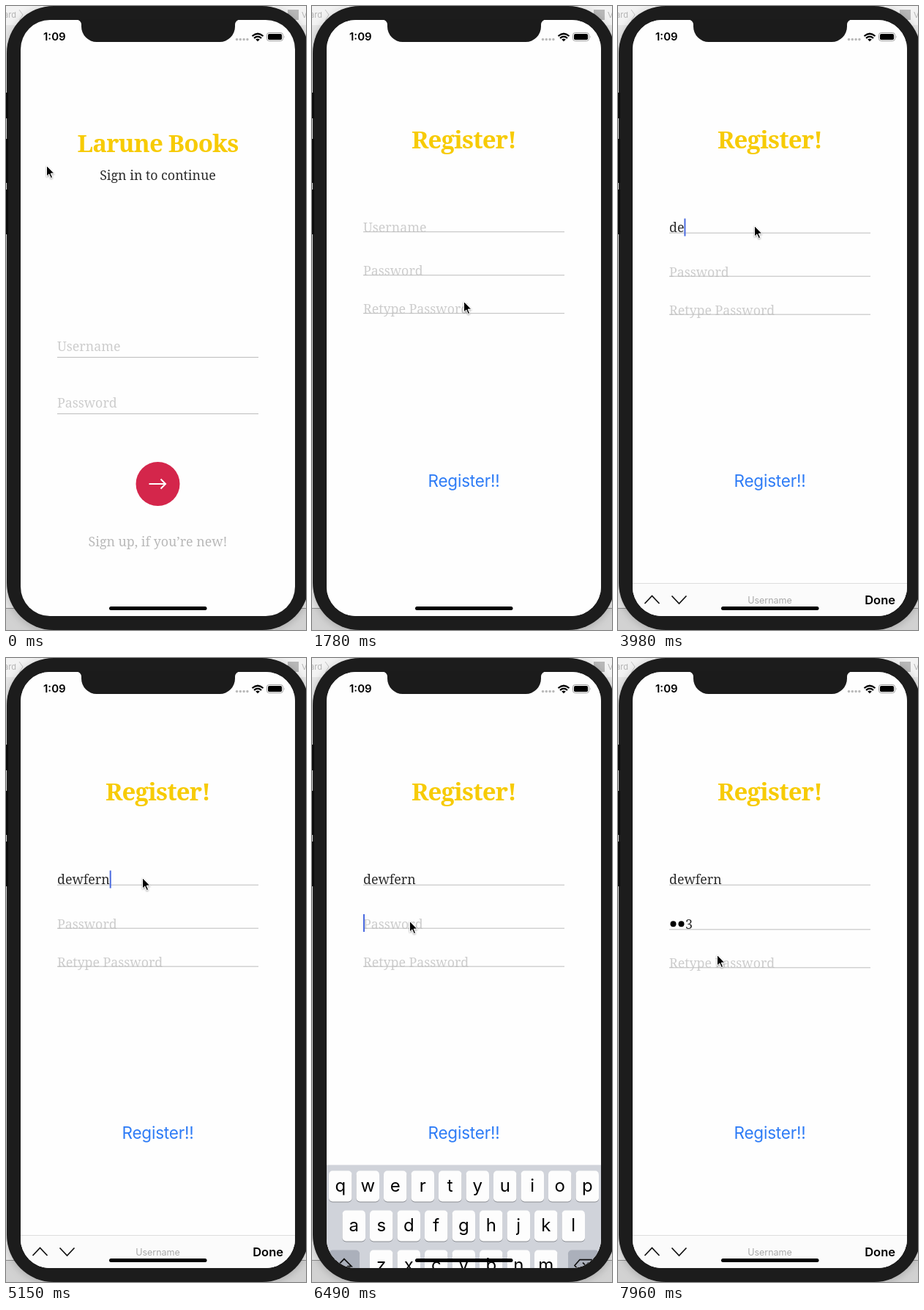
These frames come from a looping animation (410 px wide and 850 px high, 8 s). An HTML page:

```html
<!DOCTYPE html>
<html lang="en">
<head>
<meta charset="utf-8">
<title>Sign-up screen</title>
<style>
  html, body { margin: 0; width: 100%; height: 100%; overflow: hidden; background: #e6e6e6; }
  svg { display: block; }
  .slab { font: 300 17.8px "Noto Serif", serif; fill: #2c2c2c; }
  .hint { fill: #cdcdcd; }
  .title { font: 700 33px "Noto Serif", serif; letter-spacing: -0.8px; fill: #f7cb05; }
  .ui { font-family: Inter, Roboto, sans-serif; }
  .mid { text-anchor: middle; }
  .rule { stroke: #bdbdbd; stroke-width: 1; }
  .key { font-size: 24px; fill: #000; text-anchor: middle; }
  .icon { fill: none; stroke: #111; stroke-width: 1.7; }
</style>
</head>
<body>
<svg width="410" height="850" viewBox="0 0 410 850">
  <defs>
    <clipPath id="glass"><rect x="20" y="19" width="375" height="812" rx="40"/></clipPath>
    <filter id="soft" x="-50%" y="-50%" width="200%" height="200%">
      <feDropShadow dx="0" dy="1" stdDeviation="0.8" flood-opacity="0.4"/>
    </filter>
    <filter id="shade" x="-10%" y="-10%" width="120%" height="120%">
      <feDropShadow dx="0" dy="2" stdDeviation="6" flood-opacity="0.2"/>
    </filter>
  </defs>

  <!-- desktop behind the phone -->
  <rect width="410" height="850" fill="#e6e6e6"/>
  <rect width="410" height="26" fill="#f3f3f3"/>
  <rect y="820" width="410" height="30" fill="#d2d2d2"/>
  <path d="M0 820.5H410" stroke="#8c8c8c"/>
  <g class="ui" font-size="11" fill="#b4b4b4">
    <text x="-3" y="16">ard</text><text x="404" y="16">V</text>
  </g>
  <path d="M18 5l5 7-5 8" fill="none" stroke="#c4c4c4"/>
  <rect x="385" y="5" width="15" height="14" fill="#b8b8b8"/>

  <!-- phone body -->
  <rect x="1" y="0" width="413" height="850" rx="64" fill="#1b1b1b" filter="url(#shade)"/>
  <path d="M0 118h3v35H0zM0 181h3v60H0zM0 250h3v61H0z" fill="#0c0c0c"/>

  <g clip-path="url(#glass)">
    <rect x="20" y="19" width="375" height="812" fill="#fefefe"/>
    <g id="login">
      <text class="title mid" x="207.5" y="199">Larune Books</text>
      <text class="slab mid" x="207.5" y="237">Sign in to continue</text>
      <text class="slab hint" x="70" y="470">Username</text>
      <text class="slab hint" x="70" y="547">Password</text>
      <path class="rule" d="M70 478.5H345M70 555.5H345"/>
      <circle cx="207.5" cy="651" r="30" fill="#d4264b"/>
      <path d="M195.5 651H218M211.500 644.5L218 651L211.500 657.5" fill="none" stroke="#fff" stroke-width="2"/>
      <text id="signUp" class="slab mid" x="207.5" y="736" style="fill:#b9b9b9">Sign up, if you’re new!</text>
    </g>
    <g id="sheet">
      <rect x="20" y="19" width="375" height="812" fill="#fefefe"/>
      <text class="title mid" x="207.5" y="194">Register!</text>
      <text id="user" class="slab" x="70" y="308"></text>
      <path id="userRule" class="rule" d="M70 307.5H345"/>
      <g id="passRow">
        <text id="pass" class="slab hint" x="70" y="367">Password</text>
        <g id="dots"><circle cx="75.5" cy="360.5" r="4"/><circle cx="86.5" cy="360.5" r="4"/></g>
        <text id="digit" class="slab" y="367"></text>
        <path id="passRule" class="rule" d="M70 366.5H345"/>
      </g>
      <g id="againRow">
        <text class="slab hint" x="70" y="419">Retype Password</text>
        <path class="rule" d="M70 418.5H345"/>
      </g>
      <text class="ui mid" x="207.5" y="654.5" font-size="22.5" letter-spacing="-0.2" fill="#2e7cf6">Register!!</text>
      <rect id="caret" width="2" height="24" fill="#4a6ae0"/>
    </g>
    <g id="bar">
      <rect x="20" y="786" width="375" height="46" fill="#fbfbfb"/>
      <path d="M20 786.5H395" stroke="#dedede"/>
      <path class="icon" d="M36.5 814L46.5 803.5L56.5 814M73.5 803.5L83.5 814L93.5 803.5"/>
      <text class="ui mid" x="207.5" y="813.5" font-size="12.5" fill="#a9a9a9">Username</text>
      <text class="ui" x="379" y="815" font-size="16.5" font-weight="600" text-anchor="end">Done</text>
    </g>
    <g id="keys" class="ui"><rect x="20" width="375" height="291" fill="#d0d3da"/></g>
  </g>

  <!-- notch, status bar, home bar -->
  <path d="M96 18.5a7 7 0 0 1 7 7v2.500a21 21 0 0 0 21 21H292a21 21 0 0 0 21-21v-2.500a7 7 0 0 1 7-7z" fill="#1b1b1b"/>
  <text class="ui" x="51" y="47" font-size="15" font-weight="600">1:09</text>
  <g fill="#b9b9b9">
    <circle cx="315.5" cy="45.5" r="1.7"/><circle cx="320.3" cy="45.5" r="1.7"/>
    <circle cx="325.1" cy="45.5" r="1.7"/><circle cx="329.9" cy="45.5" r="1.7"/>
  </g>
  <path d="M336.5 41q7.500-6.500 15 0M339 43.800q5-4.200 10 0" fill="none" stroke="#000" stroke-width="2.2"/>
  <path d="M341.2 45.5q2.800-2 5.600 0L344 48.300z"/>
  <rect x="356.5" y="36.5" width="22" height="11" rx="3" fill="none" stroke="#9a9a9a"/>
  <rect x="358" y="38" width="19" height="8" rx="1.7"/>
  <path d="M380 40q1.500 2 0 4z" fill="#9a9a9a"/>
  <rect x="141" y="818" width="133.5" height="5" rx="2.5"/>

  <path id="cursor" d="M0 0V14.500L3.400 11.400L5.800 17L8.100 16L5.700 10.600H10.300Z" stroke="#fff"
    stroke-width="1" filter="url(#soft)"/>
</svg>
<script>
const LOOP = 8000, TICK = 147.4;
const USER_FOCUS = 17, PASS_FOCUS = 44;
const ROW_GROWTH = 1.67; // a filled field is slightly taller
const $ = id => document.getElementById(id);

// pointer path: tick, x, y
const PATH = [
  [0, 55, 217], [1, 62, 232], [2, 85, 300], [3, 130, 420], [4, 180, 560], [5, 222, 655],
  [6, 246, 710], [7, 254, 728], [9, 254, 728], [10, 248, 690], [11, 228, 540],
  [12, 207, 402], [13, 198, 340], [14, 189, 308], [15, 186, 299], [36, 186, 299],
  [38, 170, 336], [40, 145, 370], [42, 133, 358], [51, 133, 358], [54, 135, 404]
];
// tick at which each letter of the name is in place
const NAME = "dewfern", TYPED = [25, 27, 29, 31, 32, 34, 35];
const CARET_OFF = [[22, 24], [37, 40], [42, 44], [54, 55]];

// critically damped slide, 1 to 0
const spring = ms => {
  const u = Math.max(0, ms) * 0.018257;
  return (1 + u) * Math.exp(-u);
};
const shift = (id, y) => $(id).setAttribute("transform", `translate(0 ${y.toFixed(2)})`);
const show = (id, on) => { $(id).style.display = on ? "" : "none"; };

function pointer(k) {
  let i = 0;
  while (i < PATH.length - 2 && PATH[i + 1][0] <= k) i++;
  const [a, x, y] = PATH[i], [b, x2, y2] = PATH[i + 1];
  const p = Math.min(1, (k - a) / (b - a));
  return [x + (x2 - x) * p, y + (y2 - y) * p];
}

function buildKeys() {
  const key = (x, y, w, fill) =>
    `<rect x="${x}" y="${y + 1}" width="${w}" height="42" rx="5" fill="#898c92"/>` +
    `<rect x="${x}" y="${y}" width="${w}" height="42" rx="5" fill="${fill}"/>`;
  let out = "";
  ["qwertyuiop", "asdfghjkl", "zxcvbnm"].forEach((row, r) => {
    const y = 8 + r * 54, left = [23, 41.5, 79][r];
    [...row].forEach((c, i) => {
      const x = left + i * 37.5;
      out += key(x, y, 31.5, "#fdfdfd") + `<text class="key" x="${x + 15.75}" y="${y + 28}">${c}</text>`;
    });
  });
  out += key(23, 116, 42, "#abb0bb") + key(350, 116, 42, "#abb0bb");
  out += `<path class="icon" d="M44 128l10 10h-5v8h-10v-8h-5zM359 137l7-8h16v16h-16zM370 133l8 8m0-8l-8 8"/>`;
  $("keys").insertAdjacentHTML("beforeend", out);
}

function draw(time) {
  const k = Math.floor((time + 12) / TICK), ms = k * TICK;

  $("signUp").style.opacity = k >= 8 ? 0.3 : 1;
  show("sheet", k >= 9);
  shift("sheet", 812 * spring(ms - 1171.3));

  // keyboard drops away, then its toolbar rises
  const focus = k >= PASS_FOCUS ? PASS_FOCUS : USER_FOCUS;
  const since = (k - focus) * TICK;
  show("keys", k >= focus && since < 290);
  shift("keys", 831 - 291 * spring(since + 95));
  show("bar", k >= focus && since > 240);
  shift("bar", 45 * spring(since - 240));

  const count = TYPED.filter(n => n <= k).length;
  const user = $("user");
  user.textContent = count ? NAME.slice(0, count) : "Username";
  user.classList.toggle("hint", !count);
  const grow = count ? ROW_GROWTH : 0;
  shift("userRule", grow);
  shift("passRow", grow);

  const hasPass = k >= 47;
  const digit = { 47: "1", 50: "2" }[k] || (k >= 53 ? "3" : "");
  const dots = k >= 51 ? 2 : k >= 48 ? 1 : 0;
  const passGrow = hasPass ? ROW_GROWTH : 0;
  show("pass", !hasPass);
  [...$("dots").children].forEach((dot, i) => { dot.style.display = i < dots ? "" : "none"; });
  $("digit").textContent = digit;
  $("digit").setAttribute("x", 70 + dots * 11);
  shift("passRule", passGrow);
  shift("againRow", grow + passGrow);

  const inPass = k >= PASS_FOCUS;
  const end = inPass ? dots * 11 + (digit ? 10 : 0) : count ? user.getComputedTextLength() : 0;
  $("caret").setAttribute("x", 70 + end);
  $("caret").setAttribute("y", inPass ? 349 : 289.5);
  show("caret", k >= USER_FOCUS && !CARET_OFF.some(([a, b]) => k >= a && k < b));

  const [x, y] = pointer(k);
  $("cursor").setAttribute("transform", `translate(${x + 0.5} ${y + 0.5})`);
}

buildKeys();
const start = performance.now();
function loop() {
  draw((performance.now() - start) % LOOP);
  requestAnimationFrame(loop);
}
loop();
</script>
</body>
</html>
```
